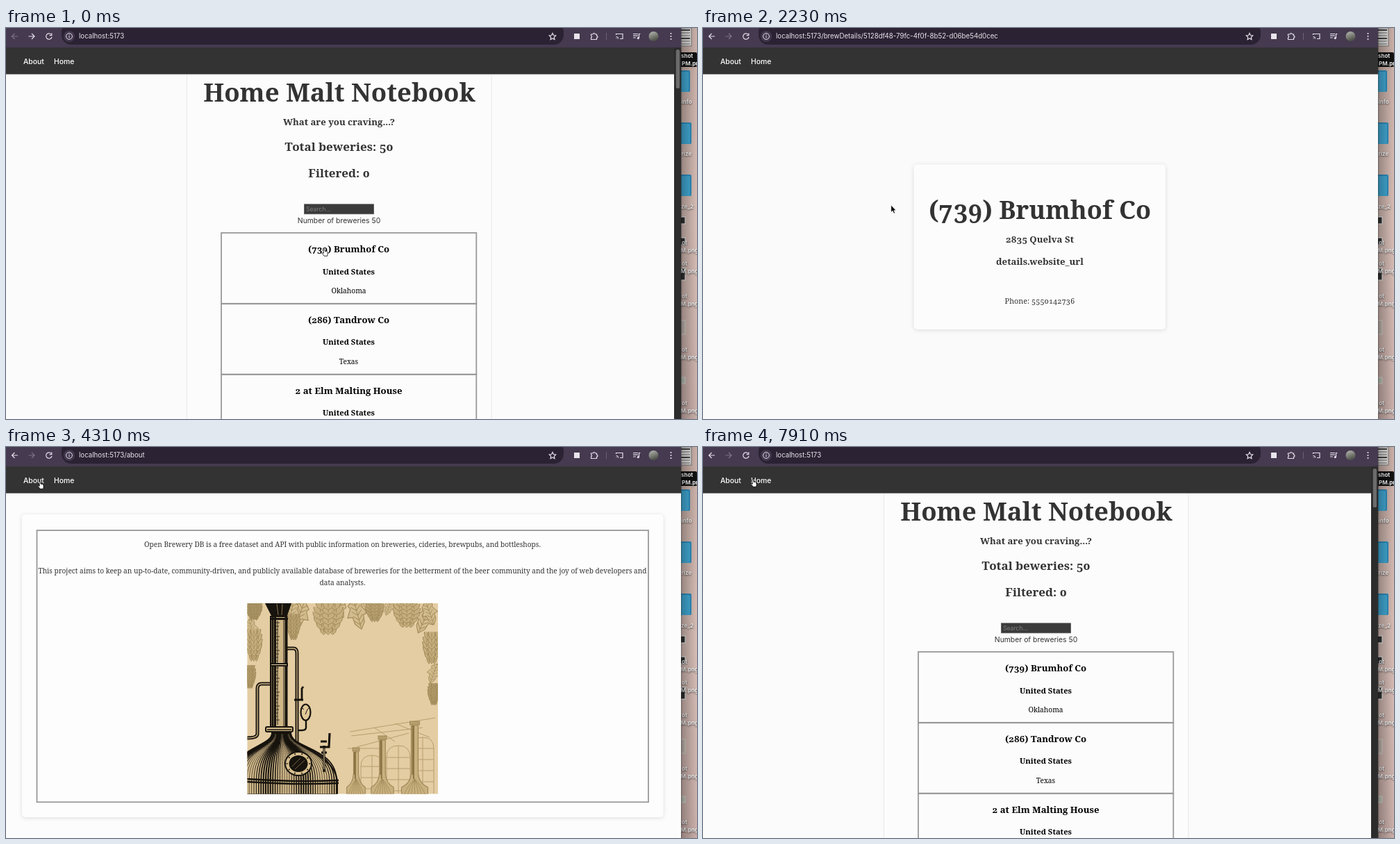
These frames come from a looping animation (995x563 px, 8 s). An HTML page:

```html
<!DOCTYPE html>
<html lang="en">
<head>
<meta charset="utf-8">
<title>Brewery list</title>
<style>
html, body { margin: 0; height: 100%; overflow: hidden; background: #fbfbfb; }
svg { display: block; width: 100vw; height: 100vh; }
text { font-family: Inter, sans-serif; white-space: pre; }
.serif { font-family: "Noto Serif", serif; font-variant-numeric: oldstyle-nums; text-anchor: middle; }
.bold { font-weight: 700; }
.desk { font-weight: 700; font-size: 8px; fill: #fff; filter: drop-shadow(0 1px 1px #000a); }
.shade { filter: drop-shadow(0 1.5px 3px #0000001f); }
.icon { fill: none; stroke: #e4dee9; stroke-width: 1.2; }
</style>
</head>
<body>
<svg id="stage" viewBox="0 0 995 563" preserveAspectRatio="none"></svg>
<script>
const INK = '#17130d', TAN = '#e4cda3', FAINT = '#a08859';
const times = (n, f) => Array.from({ length: n }, (_, i) => f(i)).join('');
const rect = (x, y, w, h, fill, more = '') =>
  `<rect x="${x}" y="${y}" width="${w}" height="${h}" fill="${fill}" ${more}/>`;
const path = (d, stroke, width = 1, fill = 'none') =>
  `<path d="${d}" fill="${fill}" stroke="${stroke}" stroke-width="${width}"/>`;
const oval = (x, y, rx, ry, fill, stroke = 'none', width = 1) =>
  `<ellipse cx="${x}" cy="${y}" rx="${rx}" ry="${ry}" fill="${fill}" stroke="${stroke}" stroke-width="${width}"/>`;
const text = (x, y, size, s, more = '') => `<text x="${x}" y="${y}" font-size="${size}" ${more}>${s}</text>`;
const serif = (x, y, size, s, fill = '#333') => text(x, y, size, s, `class="serif" fill="${fill}"`);
const bold = (x, y, size, s, fill = '#333') => text(x, y, size, s, `class="serif bold" fill="${fill}"`);
const frame = (x, y, w, h) => rect(x, y, w, h, 'none', 'stroke="#999" stroke-width="1.8"');
const panel = (x, y, w, h, fill) => rect(x, y, w, h, fill, 'rx="5" class="shade"');
const page = (id, body) => `<g id="${id}">${body}</g>`;

// ---- pages ----
function home() {
  const brews = [['(739) Brumhof Co', 'Oklahoma'], ['(286) Tandrow Co', 'Texas'], ['2 at Elm Malting House', '']];
  return rect(0, 28, 972, 535, '#fbfbfb') +
    rect(260.5, 20, 438.5, 560, '#fcfcfc', 'stroke="#e7e7e7"') +
    bold(480, 106, 36.6, 'Home Malt Notebook') +
    bold(479.5, 139.7, 13.2, 'What are you craving...?') +
    bold(479.5, 176.7, 17, 'Total beweries: 50') +
    bold(479.5, 214.7, 17, 'Filtered: 0') +
    rect(429.5, 253.8, 100, 14, '#3b3b3b', 'stroke="#555" stroke-width=".8"') +
    text(432, 264, 8.6, 'Search...', 'fill="#808080"') +
    text(479.5, 280.5, 10.4, 'Number of breweries 50', 'text-anchor="middle" fill="#333"') +
    brews.map(([name, state], i) => {
      const y = i * 101.8;
      return frame(310, 295 + y, 367.3, 102.2) + bold(493.5, 323 + y, 13.2, name, '#000') +
        bold(493.5, 354.5 + y, 11.2, 'United States', '#000') + serif(493.5, 382 + y, 10.2, state, '#000');
    }).join('');
}

const loading = () => rect(0, 28, 972, 535, '#f8f8f8') + panel(462.5, 293, 45, 45, '#f9f9f9');

const details = () => rect(0, 28, 972, 535, '#fafafa') + panel(303.5, 196.5, 362.5, 237.5, '#fcfcfc') +
  bold(485, 275, 36, '(739) Brumhof Co') + bold(485, 308.5, 13.2, '2835 Quelva St') +
  bold(485, 341, 13.2, 'details.website_url') + serif(485, 396.5, 10.8, 'Phone: 5550142736');

const about = () => rect(0, 28, 972, 535, '#fcfcfc') + panel(23, 97, 923.5, 436, '#fdfdfd') +
  frame(44.5, 120, 880.5, 391.3) +
  serif(484.5, 143.8, 10.15, 'Open Brewery DB is a free dataset and API with public information on breweries, cideries, brewpubs, and bottleshops.') +
  serif(484.5, 182, 10.15, 'This project aims to keep an up-to-date, community-driven, and publicly available database of breweries for the betterment of the beer community and the joy of web developers and') +
  serif(484.5, 198.7, 10.15, 'data analysts.') + picture();

// ---- brewery picture ----
function hop(x, y, w, h, fill = '#c6ae7e') {
  const rows = 6;
  return times(rows, i => {
    const r = rows - 1 - i, u = r / rows, half = w * Math.sin(Math.PI * (0.3 + 0.62 * u)), cy = y + h * u;
    return [0, 2, 1].map(k => {
      const cx = x + (k - 1) * half * 0.6, s = half * 0.5;
      return path(`M${cx - s},${cy - 2}C${cx - s},${cy + h / 6} ${cx - s / 3},${cy + h / 6} ${cx},${cy + h / 4.5}` +
        `C${cx + s / 3},${cy + h / 6} ${cx + s},${cy + h / 6} ${cx + s},${cy - 2}M${cx},${cy}v${h / 7}`, FAINT, 1, fill);
    }).join('');
  });
}

const leaf = (x, y, len, turn) => `<g transform="translate(${x},${y}) rotate(${turn}) scale(${len / 40})">` +
  path('M0,0L-9,8L-7,12L-13,22L-7,23L-6,32L0,40L6,32L7,23L13,22L7,12L9,8Z', FAINT, 1, '#d2bb8c') +
  path('M0,0V38' + times(5, i => `M0,${10 + i * 6}l-6,-6M0,${10 + i * 6}l6,-6`), FAINT, 0.8) + '</g>';

const smallStill = (x, top, s) =>
  path(`M${x - s * 5},${top + 6}V470Q${x - s * 6},484 ${x - s * 19},490V500H${x + s * 19}V490Q${x + s * 6},484 ${x + s * 5},470V${top + 6}Z`, FAINT, 1.2, '#c9b07f') +
  path(`M${x - s * 3},${top + 6}V472M${x - s * 1.5},${top + 6}V478`, '#8a7343', 1.8) +
  rect(x - s * 7, top, s * 14, 5, '#b79e6c', `stroke="${FAINT}"`) +
  times(7, i => path(`M${x},478Q${x + (i - 3) * s * 3},486 ${x + (i - 3) * s * 5},500`, FAINT, 0.8));

const arch = (x, y, w) => path(`M${x - w},499V${y + w}Q${x - w},${y} ${x},${y}Q${x + w},${y} ${x + w},${y + w}V499M${x},${y}V499` +
  times(4, i => `M${x - w},${y + w + i * 16}h${2 * w}`), '#b69e6e', 1);

function still() {
  const pipe = d => path(d, INK, 5) + path(d, '#cdb485', 1.4);
  const dome = 'M383,412C383,432 325,432 322,480V500H477V480C470,438 411,434 410,412Z';
  return pipe('M404,290H414Q419,290 419,297V432') + pipe('M381,341H368Q362,341 362,348V413Q362,419 347,419') +
    path('M373,224L383,244H404L411,224Z', INK, 1, INK) + path('M390,226l2,16M398,226l-1,16', '#8a754d') +
    rect(381, 244, 23.5, 160, '#cfb687', `stroke="${INK}" stroke-width="2"`) +
    path('M384,244V404M387.5,244V404M403,244V404', INK, 3) + path('M391,250V400M400,246V402', INK, 0.9) +
    times(30, i => path(`M388,${248 + i * 5}h${3 + i * 7 % 4}`, INK, 0.8)) +
    rect(380, 246, 26, 3, INK) + rect(380, 311, 26, 5, INK) + path('M382,313.5h22', TAN) +
    path(dome, INK, 2, '#d3ba8b') +
    times(46, i => {
      const u = i / 45, a = 384 + 26 * u, b = 323 + 153 * u;
      return path(`M${a},412C${a},434 ${b},432 ${b},481V500`, INK, 0.6 + 1.5 * Math.cos(u * 9) ** 2);
    }) +
    path('M347,478Q420,483 479,480M347,482Q420,487 479,484', INK, 2.4) +
    rect(374, 403, 39, 7, '#cfb687', `rx="2" stroke="${INK}" stroke-width="2"`) + path('M376,407H411', INK, 1.5) +
    oval(421, 456, 19, 17, '#d8c08f', INK, 2) + oval(421, 456, 13.5, 12, INK) +
    path('M412,460l12,-12M416,464l14,-13', '#776540') +
    times(10, i => oval(421 + 16.3 * Math.cos(i * 0.63), 456 + 14.5 * Math.sin(i * 0.63), 1, 1, INK)) +
    path('M432,394V404Q432,408 426,408H420', INK, 2.4) + oval(431.5, 382, 7, 11.5, '#e0c899', INK, 2.2) +
    path('M431,385l3,-7M427,376l2,2M436,376l-2,2', INK) +
    path('M415,364H428M426,364V348L428,345', INK, 2.8) +
    path('M458,468V430M452,432H465L466,412M453,424h9M454,440h8', INK, 3.2) + path('M458,464V434', TAN, 1);
}

const picture = () => `<clipPath id="crop">${rect(347.5, 225, 274.5, 274.5)}</clipPath><g clip-path="url(#crop)">` +
  rect(347, 224, 276, 277, TAN) +
  [[430, 222, 44, 20], [500, 218, 46, -15], [486, 220, 40, 30], [556, 218, 26, 20], [414, 220, 40, 10], [612, 228, 44, 25],
    [604, 222, 36, -20], [621, 312, 30, 20], [350, 248, 30, -15], [515, 220, 30, -40]].map(a => leaf(...a)).join('') +
  [[464, 225, 20, 43], [531, 223, 12, 27, '#b9a272'], [577, 222, 18, 36], [613, 268, 12, 42], [616, 342, 8, 28, '#b39b6a'],
    [357, 222, 11, 26, '#a89465'], [357, 264, 11, 42], [351, 316, 8, 30, '#b39b6a'], [414, 242, 9, 34, '#b9a272']].map(a => hop(...a)).join('') +
  path('M495,410L618,390M497,416L600,404M505,432L580,412M492,434H540M560,398l50,20M530,404l30,20', '#b69e6e', 1) +
  arch(527, 444, 16) + arch(565, 430, 17) + arch(600, 418, 16) +
  smallStill(504, 433, 0.7) + smallStill(542, 416, 0.85) + smallStill(588.5, 395, 1) + still() + '</g>';

// ---- window and desktop ----
function chrome() {
  const icon = d => `<path class="icon" d="${d}"/>`;
  return rect(0, 0, 972, 28, '#453a50') + rect(80, -8, 723, 32, '#2b2333', 'rx="14"') +
    `<circle id="hover" cx="12.5" cy="12" r="11.5" fill="#75697f"/>` +
    `<path id="back" class="icon" d="M17,12H8.5M12.5,8L8.5,12L12.5,16"/>` +
    `<path id="next" class="icon" d="M32.5,12H41M37,8L41,12L37,16"/>` +
    icon('M65,9.2A4.2,4.2 0 1 0 66,13M65.8,7.5V10.6H62.6') +
    oval(91, 12, 8, 8, '#43384e') + oval(91, 12, 4.4, 4.4, 'none', '#e4dee9') + path('M91,11.3v3M91,9.2v1.1', '#e4dee9') +
    text(105, 15.4, 9.7, '', 'id="url" fill="#e8e3ec"') +
    icon('M787,7.5l1.4,3 3.3,.4 -2.4,2.3 .6,3.3 -2.9,-1.6 -2.9,1.6 .6,-3.3 -2.4,-2.3 3.3,-.4Z') +
    rect(818, 8, 8, 8, '#e9e5ec') +
    icon('M842.5,9H845.3A1.5,1.5 0 0 1 848.3,9H850.5V11.2A1.5,1.5 0 0 1 850.5,14.2V16.5H842.5V14A1.6,1.6 0 0 0 842.5,11Z') +
    rect(864, 7, 1, 10, '#6b6076') +
    icon('M878.5,10V8.5H888V15.5H884M878.5,12.5a3,3 0 0 1 3,3M878.5,15h.8') +
    icon('M903,8.5h7M903,11.2h7M903,14h4M911.5,14.5V8.5h2') + oval(910.3, 14.6, 1.6, 1.6, '#e4dee9') +
    oval(932.5, 12, 7, 7, 'url(#avatar)') + times(3, i => oval(957.5, 8 + i * 4, 1.1, 1.1, '#e4dee9')) +
    rect(0, 28, 972, 38.6, '#333') +
    text(25, 51.6, 10.4, 'About', 'font-weight="500" fill="#fff"') + text(69, 51.6, 10.4, 'Home', 'font-weight="500" fill="#fff"') +
    `<g id="bar">${rect(962, 28, 10, 535, '#2c2c2c')}${rect(964.7, 31, 5.3, 56, '#6c6c6c', 'rx="2.6"')}</g>`;
}

function desktop() {
  const label = (x, y, s) => text(x, y, 8, s, 'class="desk"');
  const folder = (y, w) => rect(970, y, w + 2, 31, '#2f8fc0', 'rx="2"') + rect(970, y + 2, w, 29, '#43acd9', 'rx="2"');
  const thumb = (y, w, h, fill, edge) => rect(968, y, w + 4, h, fill, `stroke="${edge}" stroke-width="1.2"`);
  return rect(970, 0, 25, 563, 'url(#wall)') + rect(970, 0, 17, 26, '#e6e3e1', 'stroke="#777"') +
    times(6, i => rect(972, 2 + i * 4, 13, 2, i % 3 ? '#aaa' : '#444')) +
    rect(970, 35, 25, 21, '#111', 'rx="2"') + label(972, 43, 'shot') + label(973, 53.5, 'PM.pr') +
    folder(61, 13) + label(972.5, 108.5, 'info') + folder(136, 15) + label(972.5, 184, 'rize') +
    folder(211, 15) + label(972, 259.5, 'ze_2') +
    thumb(272, 6, 10, '#333', '#eee') + thumb(302, 6, 10, '#333', '#eee') + thumb(346, 6, 17, '#333', '#eee') +
    thumb(421, 6, 20, '#c3b7b0', '#ddd5d0') + thumb(503, 6, 9, '#bfc5b8', '#ddd5d0') +
    [[312, 323], [342, 353], [389, 400], [466, 477], [543, 554]].map(([a, b]) => label(973, a, 'ot') + label(971.5, b, 'M.png')).join('') +
    rect(972, 0, 23, 563, 'url(#edge)');
}

const $ = id => document.getElementById(id);
$('stage').innerHTML = `<defs>
<linearGradient id="wall" x2="0" y2="1"><stop stop-color="#c9b0a8"/><stop offset=".5" stop-color="#d8bfb7"/><stop offset="1" stop-color="#cbb0ab"/></linearGradient>
<linearGradient id="edge"><stop stop-color="#0008"/><stop offset=".08" stop-color="#0004"/><stop offset="1" stop-color="#0000"/></linearGradient>
<linearGradient id="avatar" x2=".4" y2="1"><stop stop-color="#b9bcb4"/><stop offset="1" stop-color="#4d5148"/></linearGradient></defs>` +
  desktop() + page('home', home()) + page('loading', loading()) + page('details', details()) + page('about', about()) + chrome() +
  `<g id="cursor"><path id="arrow" d="M0,0V10.6L2.4,8.4L4.1,12.2L5.9,11.4L4.3,7.8H7.4Z" fill="#000" stroke="#fff" stroke-width=".8"/>
<path id="hand" d="M1.6,1.2Q2.4,-.2 3.3,1.2L4.2,4.3Q7,4 7.8,5.6Q8.6,8 7.7,11.3H3.1Q1.6,9.2 .1,7.5Q.2,6 2.4,7.2Z" fill="#fff" stroke="#000" stroke-width=".8"/></g>`;

// ---- timeline, counted in screen updates ----
const LOOP = 8000, STEP = 149;
const scenes = [[0, 'home'], [10, 'loading'], [11, 'details'], [23, 'home'], [29, 'about'], [53, 'home']];
const urls = { home: '', loading: '', details: '/brewDetails/5128df48-79fc-4f0f-8b52-d06be54d0cec', about: '/about' };
// step, x, y, is hand
const moves = [[0, 455, 317, 1], [2, 529, 340, 1], [4, 330, 385, 1], [5, 232, 390, 0], [6, 240, 370, 0], [7, 330, 372, 1],
  [8, 387, 366, 1], [10, 390, 366, 0], [12, 390, 366, 0], [20, 13, 15, 0], [23, 13, 15, 0], [26, 46, 49, 1], [29, 46, 49, 1],
  [30, 160, 130, 0], [32, 541, 342, 0], [37, 541, 342, 0], [42, 20, 41, 1], [44, 13, 29, 0], [45, 27, 48, 1], [48, 27, 48, 1], [52, 69, 46, 1]];
const show = (id, on) => { $(id).style.display = on ? '' : 'none'; };

function draw(now) {
  const n = Math.floor((now % LOOP + 15) / STEP);
  const scene = scenes.findLast(s => s[0] <= n)[1];
  for (const id in urls) show(id, id === scene);
  $('url').textContent = 'localhost:5173' + urls[scene];
  const first = n < 11 || (n > 22 && n < 29);
  $('back').style.opacity = first ? 0.35 : 1;
  $('next').style.opacity = first ? 1 : 0.35;
  show('hover', n === 22);
  show('bar', scene === 'home');

  const i = moves.findLastIndex(m => m[0] <= n), a = moves[i], b = moves[i + 1] || a;
  const u = a === b ? 0 : (n - a[0]) / (b[0] - a[0]), e = u * u * (3 - 2 * u);
  $('cursor').setAttribute('transform', `translate(${a[1] + (b[1] - a[1]) * e},${a[2] + (b[2] - a[2]) * e})`);
  show('hand', a[3]);
  show('arrow', !a[3]);
}

const start = performance.now();
(function tick() {
  draw(performance.now() - start);
  requestAnimationFrame(tick);
})();
</script>
</body>
</html>
```
